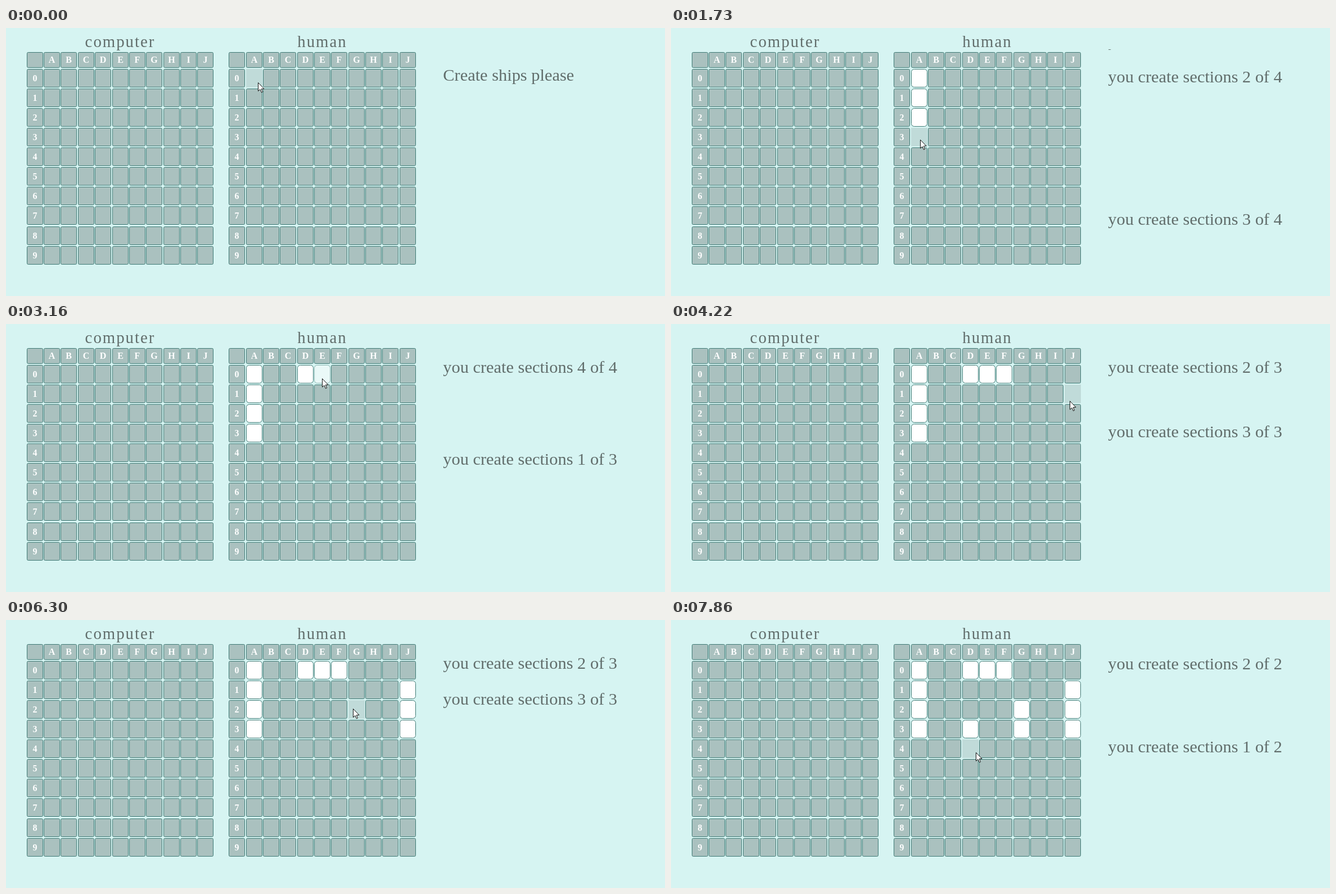
An HTML page with a canvas that plays this animation: 1172 px wide and 478 px high, repeating every 7990 ms.

```html
<!DOCTYPE html>
<html lang="en">
<head>
<meta charset="utf-8">
<title>Sea battle setup</title>
<style>
html, body { margin: 0; width: 100%; height: 100%; overflow: hidden; background: #d6f4f2; }
canvas { display: block; }
</style>
</head>
<body>
<canvas id="stage" width="1172" height="478"></canvas>
<script>
const ctx = document.getElementById('stage').getContext('2d');
const LOOP = 7990, STEP = 130;
const BG = '#d6f4f2', CELL = '#aac1bf', HOVER = '#c0dbd9', LINE = '#3f7a75', INK = '#616d6b';
const SERIF = '"Liberation Serif", "Times New Roman", serif';
const COMPUTER = 67.6, HUMAN = 427.05, COL = 30.36, TOP = 73.2, ROW = 35.1;
const CELL_W = 29, CELL_H = 33, HEAD_H = 28;
const GAP = 64, START_GAP = 300, SLIDE = 700, SCROLL = 57;
const DWELL = 30, TRAVEL = 120;

// Each ship: first cell, direction, pointer offset in a cell, click times
const ships = [
  { cell: [0, 0], down: true, grip: [17, 23], times: [355, 1005, 1622, 2055] },
  { cell: [3, 0], down: false, grip: [15, 24], times: [2927, 3159, 3882] },
  { cell: [9, 1], down: true, grip: [10, 29], times: [4632, 4975, 5465] },
  { cell: [6, 2], down: true, grip: [9, 15], times: [6400, 6955] },
  { cell: [3, 3], down: true, grip: [25, 23], times: [7599, 8200] }
];

const colX = (left, c) => Math.floor(left + COL * c);
const rowY = r => Math.floor(TOP + ROW * r);

const clicks = ships.flatMap(({ cell, down, grip, times }) => times.map((at, i) => {
  const col = cell[0] + (down ? 0 : i), row = cell[1] + (down ? i : 0);
  return {
    at, col, row,
    x: colX(HUMAN, col) + grip[0], y: rowY(row) + grip[1],
    label: `you create sections ${i + 1} of ${times.length}`
  };
}));

// The picture is held for about one step at a time, with three longer pauses.
function hold(t) {
  const starts = [0, 420, 1470, 4090, LOOP];
  const i = starts.findLastIndex(s => s <= t);
  const last = Math.floor((starts[i + 1] - starts[i]) / STEP) - 1;
  return starts[i] + STEP * Math.min(last, Math.floor((t - starts[i]) / STEP));
}

// cubic-bezier(.25, .1, .25, 1)
function ease(x) {
  if (x >= 1) return 1;
  let lo = 0, hi = 1;
  for (let i = 0; i < 20; i++) {
    const u = (lo + hi) / 2;
    if (0.75 * u * (1 - u) + u ** 3 < x) lo = u; else hi = u;
  }
  return 0.3 * lo * (1 - lo) ** 2 + 3 * lo * lo * (1 - lo) + lo ** 3;
}

// After each click the pointer dwells, then darts to the next cell.
function pointerAt(t) {
  const i = clicks.findIndex(k => k.at > t);
  const from = clicks[i - 1] || { at: 0, x: 449, y: 97 }, to = clicks[i];
  const u = Math.min(1, Math.max(0, (t - from.at - DWELL) / TRAVEL));
  const k = 1 - (1 - u) ** 3;
  return [Math.round(from.x + (to.x - from.x) * k), Math.round(from.y + (to.y - from.y) * k)];
}

function text(str, x, y, font, color, align = 'left', spacing = 0) {
  ctx.font = `${font} ${SERIF}`;
  ctx.letterSpacing = spacing + 'px';
  ctx.textAlign = align;
  ctx.fillStyle = color;
  ctx.fillText(str, x, y);
}

function box(x, y, h, fill, radius = 2) {
  ctx.beginPath();
  ctx.roundRect(x + 0.5, y + 0.5, CELL_W - 1, h - 1, radius);
  ctx.fillStyle = fill;
  ctx.fill();
  ctx.strokeStyle = LINE;
  ctx.stroke();
}

function patch(c, r, color) {
  ctx.fillStyle = color;
  ctx.fillRect(colX(HUMAN, c), rowY(r), CELL_W, CELL_H);
}

function board(left) {
  const label = (str, x, y) => text(str, x + CELL_W / 2, y, 'bold 16px', '#fff', 'center');
  for (let c = -1; c < 10; c++) {
    const x = colX(left, c);
    box(x, 43, HEAD_H, CELL);
    if (c >= 0) label('ABCDEFGHIJ'[c], x, 62);
    for (let r = 0; r < 10; r++) {
      box(x, rowY(r), CELL_H, CELL);
      if (c < 0) label(r, x, rowY(r) + 22);
    }
  }
}

function drawShips(t, px, py) {
  const hc = Math.floor((px - HUMAN) / COL), hr = Math.floor((py - TOP) / ROW);
  patch(hc, hr, HOVER);
  for (const { at, col, row } of clicks) {
    if (at > t) break;
    patch(col, row, BG);
    ctx.globalAlpha = col === hc && row === hr ? 0.5 : 1;
    box(colX(HUMAN, col), rowY(row), CELL_H, '#fff', 5);
    ctx.globalAlpha = 1;
  }
}

// New lines slide up towards the previous one while the list scrolls.
function messages(t) {
  ctx.save();
  ctx.beginPath();
  ctx.rect(760, 38, 412, 386);
  ctx.clip();
  let y = 94, scroll = 0;
  const lines = [['Create ships please', y]];
  clicks.forEach(({ at, label }, i) => {
    if (at > t) return;
    y += START_GAP + (GAP - START_GAP) * ease((t - at) / SLIDE);
    scroll += (i ? GAP : 7) * (1 - Math.exp((at - t) / SCROLL));
    lines.push([label, y]);
  });
  for (const [str, base] of lines) text(str, 777.3, Math.round(base - scroll), '30.4px', INK);
  ctx.restore();
}

function pointer(x, y) {
  ctx.save();
  ctx.translate(x - 0.5, y + 0.5);
  ctx.fillStyle = '#fff';
  ctx.strokeStyle = '#111';
  const arrow = new Path2D('M0 0V15L3.5 12L6 17.5L8 16.5L5.8 11.2L10.5 11Z');
  ctx.fill(arrow);
  ctx.stroke(arrow);
  ctx.restore();
}

function draw(now) {
  const t = hold(now % LOOP), [px, py] = pointerAt(t);
  ctx.fillStyle = BG;
  ctx.fillRect(0, 0, 1172, 478);
  text('computer', 140.6, 34, '28.8px', INK, 'left', 2);
  text('human', 518.3, 34, '28.8px', INK, 'left', 2);
  board(COMPUTER);
  board(HUMAN);
  drawShips(t, px, py);
  messages(t);
  pointer(px, py);
}

const begin = performance.now();
function tick() {
  draw(performance.now() - begin);
  requestAnimationFrame(tick);
}
tick();
</script>
</body>
</html>
```
